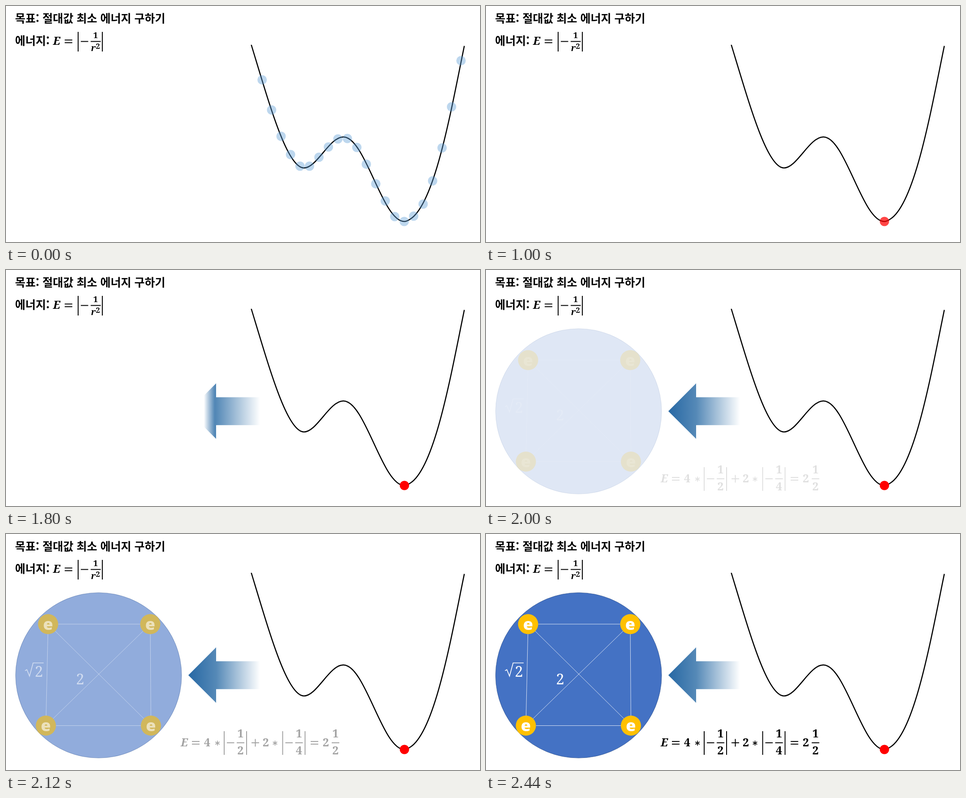
Write an HTML page that moves like this. It is 1058x529 px and loops after 3.99 s.

```html
<!DOCTYPE html>
<html lang="ko">
<head>
<meta charset="utf-8">
<title>에너지</title>
<style>
html, body { margin: 0; width: 100%; height: 100%; overflow: hidden; background: #fff; }
svg { display: block; width: 100%; height: 100%; }
.ko { font: 600 25px "Noto Sans CJK KR", "Noto Sans CJK", "Noto Sans CJK JP", sans-serif; }
.math { font: 700 25px "Noto Serif", serif; text-anchor: middle; }
.it { font-style: italic; }
.e { font: 800 36px "Open Sans", "Noto Sans", sans-serif; text-anchor: middle; fill: #fff; }
.len { font: 400 33px "Noto Serif", serif; text-anchor: middle; fill: #fff; }
.rule { stroke: #000; stroke-width: 2; fill: none; }
.link { stroke: #fff; stroke-width: .8; fill: none; }
</style>
</head>
<body>
<svg viewBox="0 0 1058 529">
  <defs>
    <linearGradient id="blue" gradientUnits="userSpaceOnUse" x1="407" y1="0" x2="567" y2="0">
      <stop offset="0" stop-color="#2768a4"/>
      <stop offset=".39" stop-color="#5589b7"/>
      <stop offset="1" stop-color="#fff"/>
    </linearGradient>
    <linearGradient id="edge" gradientUnits="userSpaceOnUse" y1="0" y2="0">
      <stop offset="0" stop-color="#000"/>
      <stop offset="1" stop-color="#fff"/>
    </linearGradient>
    <mask id="wipe" maskUnits="userSpaceOnUse" x="400" y="245" width="175" height="140">
      <rect x="400" y="245" width="175" height="140" fill="url(#edge)"/>
    </mask>
  </defs>

  <text class="ko" x="20.3" y="36.5">목표: 절대값 최소 에너지 구하기</text>
  <text class="ko" x="20.3" y="87.3">에너지:</text>
  <g id="formula"></g>

  <path fill="none" stroke="#000" stroke-width="2.5" d="M547.5 87C587 217 627 363 665 363
    C694 363 722 293.5 753 293.5C802 293.5 840 483 889 483
    C894 483 898.5 480.2 903 477.2C958 441 994 230 1023 89.5"/>
  <g id="samples" fill="#5b9bd5" fill-opacity=".4"></g>
  <circle id="best" cx="889.3" cy="483" r="10.5" fill="#f00"/>

  <g mask="url(#wipe)">
    <path fill="url(#blue)" d="M407 316.5L469 254V285.3H567V347.7H469V378.5Z"/>
  </g>
  <g id="atom"></g>
  <g id="sum"></g>
</svg>
<script>
const LOOP = 3990;
const $ = id => document.getElementById(id);
const clamp = v => Math.max(0, Math.min(1, v));
const ramp = (t, from, to) => clamp((t - from) / (to - from));

const rule = d => `<path class="rule" d="${d}"/>`;
const sign = (x, y, s, size = 25, cls = "") =>
  `<text class="math ${cls}" x="${x}" y="${y}" style="font-size:${size}px">${s}</text>`;
const equals = (x, y) => rule(`M${x} ${y - 3}h17m-17 6h17`);
const bar = (x, top, bottom) => rule(`M${x} ${top}V${bottom}`);
const frac = (x, a, b) =>
  rule(`M${x - 8.5} 468h17`) + sign(x, 456, a) + sign(x, 494, b);
const star = x => `<g stroke="#000" stroke-width="1.7">` + [0, 60, 120].map(a =>
  `<path d="M${x} 463.3v11" transform="rotate(${a} ${x} 468.8)"/>`).join("") + "</g>";
// |-1/n| starting at its left bar
const absFrac = (x, n) => bar(x, 442, 495) + rule(`M${x + 6} 468h16.5`) +
  frac(x + 36.5, 1, n) + bar(x + 50, 442, 495);

$("formula").innerHTML =
  sign(113, 87, "E", 25, "it") + equals(131, 79.3) + bar(161, 58, 102) +
  rule("M167 79.5h16.5M189 79.5h22.5") + sign(200, 72, 1, 18.5) +
  sign(195, 101, "r", 19, "it") + sign(205.3, 95.5, 2, 16) + bar(215, 58, 102);

$("sum").innerHTML =
  sign(398, 476, "E", 25, "it") + equals(415, 468) + sign(449, 476, 4) + star(472) +
  absFrac(487, 2) + rule("M548 468h17m-8.5 -8.5v17") + sign(580, 476, 2) + star(600.5) +
  absFrac(617.5, 4) + equals(680, 468) + sign(714, 476, 2) + frac(735.5, 1, 2);

const heights = [165.5, 233, 292, 333, 359, 359, 339, 316, 298, 297, 317, 354.5,
  398.5, 437, 472, 483, 471, 444, 392, 318, 226, 122.5];
$("samples").innerHTML = heights.map((y, i) =>
  `<circle cx="${571.7 + i * 21.14}" cy="${y}" r="10.5"/>`).join("");

const R = 22.5;
const electrons = [[94, 202], [322, 202], [323.5, 429.5], [89, 429.5]];
function link([ax, ay], [bx, by]) {
  const k = R / Math.hypot(bx - ax, by - ay), dx = (bx - ax) * k, dy = (by - ay) * k;
  return `<path class="link" d="M${ax + dx} ${ay + dy}L${bx - dx} ${by - dy}"/>`;
}
$("atom").innerHTML =
  `<circle cx="206.7" cy="316.8" r="185.3" fill="#4472c4" stroke="#2f528f" stroke-width=".8"/>` +
  electrons.map((a, i) => electrons.slice(i + 1).map(b => link(a, b)).join("")).join("") +
  electrons.map(([x, y]) => `<circle cx="${x}" cy="${y}" r="${R}" fill="#ffc000"/>` +
    `<text class="e" x="${x}" y="${y + 12.5}">e</text>`).join("") +
  `<path d="M42.5 306.5L46.5 304L52.5 318.5L60.5 289H84" fill="none" stroke="#fff" stroke-width="1.7"/>` +
  `<text class="len" x="73.5" y="319.5">2</text><text class="len" x="165.5" y="337">2</text>`;

function draw(t) {
  $("samples").setAttribute("opacity", 1 - ramp(t, 0, 520));
  $("best").setAttribute("opacity", 1 - (1 - ramp(t, 400, 1400)) ** 1.4);

  const x = 567 - Math.max(0, t - 1474) * .383;
  $("edge").setAttribute("x1", x);
  $("edge").setAttribute("x2", x + 24);

  // inherited by each shape, so overlapping shapes blend one by one
  const a = ramp(t, 1953, 2241);
  $("atom").setAttribute("fill-opacity", a);
  $("atom").setAttribute("stroke-opacity", a);
  $("sum").setAttribute("opacity", ramp(t, 1940, 2440));
}

const start = performance.now();
function tick() {
  draw((performance.now() - start) % LOOP);
  requestAnimationFrame(tick);
}
tick();
</script>
</body>
</html>
```
